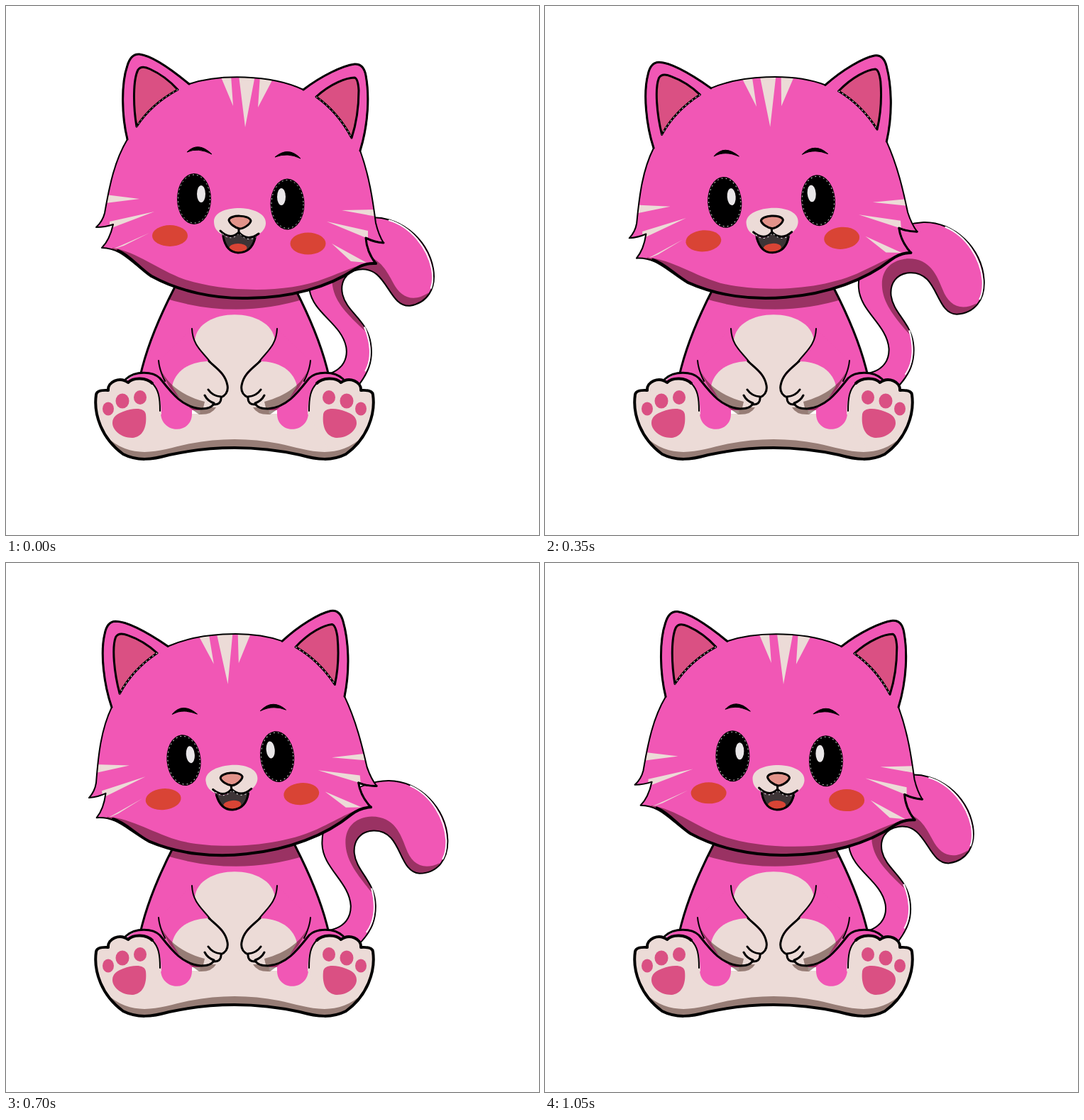
Write an HTML page that moves like this. It is 751x746 px and loops after 1.12 s.

```html
<!DOCTYPE html>
<html lang="en">
<head>
<meta charset="utf-8">
<title>Pink kitten</title>
<style>
  html, body { margin: 0; width: 100%; height: 100%; overflow: hidden; background: #fff; }
  svg { display: block; width: 100vw; height: 100vh; }
  .pink { fill: #f157b5; }
  .cream { fill: #ecdbd7; }
  .rose { fill: #da5083; }
  .blush { fill: #d94435; }
  .shade { fill: #a3928c; mix-blend-mode: multiply; }
  .line { fill: none; stroke: #000; stroke-width: 3; stroke-linecap: round; stroke-linejoin: round; }
  .thin { stroke-width: 2; }
  .bold { stroke-width: 4; }
  .filled { stroke: #000; stroke-width: 3; stroke-linejoin: round; }
  .glint { fill: none; stroke: #fff; stroke-width: 1; stroke-dasharray: 2 4; }
</style>
</head>
<body>
<svg viewBox="0 0 751 746">
  <defs>
    <path id="tailShape" d="M455 540L459 517C478 513 487 500 487 484C486 450 449 430 449 396C449 350 490 309 545 309
      C588 310 626 350 626 395C626 423 610 441 585 441C554 438 563 379 522 379C503 379 493 393 494 410
      C496 436 522 450 522 484C522 508 513 525 490 545Z"/>
    <path id="headShape" d="M171 188C163 155 162 110 171 84Q176 67 188 68C206 70 235 91 258 110
      C300 96 372 96 419 118C445 98 475 84 491 82Q504 81 507 98C512 125 511 165 499 204
      C512 240 517 275 521 306Q525 323 532 334Q518 333 507 327Q508 346 521 363
      Q506 362 492 371C455 396 400 412 340 412C295 413 245 403 205 381C175 362 165 342 135 341
      Q146 330 151 308Q140 312 127 312Q136 304 139 292C146 252 153 218 171 188Z"/>
    <path id="bodyShape" d="M237 396C218 435 200 475 190 518L205 570H439L454 518C444 475 426 435 407 396Z"/>
    <path id="lapShape" d="M127 548Q128 541 144 542C143 530 160 522 172 531C180 523 198 524 206 532
      C217 543 218 556 219 575H425C426 556 427 543 438 532C446 524 464 523 472 531
      C484 522 501 530 500 542Q516 541 517 548C521 576 509 610 479 632C459 642 439 640 414 633
      C354 620 290 620 230 633C205 640 185 642 165 632C135 610 123 576 127 548Z"/>
    <path id="armShape" d="M215 500C218 512 221 524 233 541C246 557 260 567 275 568Q287 570 293 562
      Q304 562 304 552Q313 546 312 533C309 514 292 509 278 491Q262 472 262 455Z"/>
    <clipPath id="tailClip"><use href="#tailShape"/></clipPath>
    <clipPath id="headClip"><use href="#headShape"/></clipPath>
    <clipPath id="bodyClip"><use href="#bodyShape"/></clipPath>
    <clipPath id="lapClip"><use href="#lapShape"/></clipPath>
    <clipPath id="armClip"><use href="#armShape"/></clipPath>

    <path id="thigh" class="pink" d="M168 530Q188 510 214 521L262 560V575C262 604 220 604 218 575L215 560Z"/>
    <path id="foot" class="cream" d="M127 548Q128 541 144 542C143 530 160 522 172 531C180 523 198 524 206 532
      C217 543 218 556 219 575L190 625L140 600Z"/>
    <g id="limbs">
      <path class="shade" d="M258 566H296Q290 577 272 576Z"/>
      <g clip-path="url(#armClip)">
        <use href="#armShape" class="pink"/>
        <path class="cream" d="M234 536C239 513 260 501 288 501L320 540L300 575H258Z"/>
        <path class="shade" d="M213 498C220 528 243 548 280 558L276 575L215 545Z"/>
      </g>
      <path class="line" d="M169 526C182 514 207 515 217 525C232 544 248 566 275 568Q290 568 293 560Q284 557 280 549"/>
      <path class="line" d="M293 562Q304 562 303 551Q291 550 285 541M303 552Q314 547 312 535C309 519 298 512 286 501"/>
      <path class="line thin" d="M262 455C263 480 278 488 290 505M215 500Q216 513 224 529M206 532C215 541 217 552 217 571"/>
    </g>
    <g id="pads" class="rose">
      <ellipse cx="144" cy="568" rx="8" ry="9.5"/>
      <ellipse cx="164" cy="557" rx="9.5" ry="10.5"/>
      <ellipse cx="189" cy="552" rx="9" ry="10"/>
      <path d="M165 572C180 566 196 566 197 576C199 595 192 608 178 609C162 609 150 598 150 588C150 579 157 575 165 572Z"/>
    </g>
    <g id="eye">
      <ellipse rx="24" ry="36"/>
      <ellipse class="glint" rx="22.5" ry="34" opacity=".8"/>
    </g>
  </defs>

  <g id="tail">
    <use href="#tailShape" class="pink"/>
    <path class="shade" clip-path="url(#tailClip)" d="M517 466C497 440 482 420 482 396C482 370 500 359 520 359
      C552 360 560 385 567 405C574 427 590 438 614 427L600 450H560L520 400L500 400Z"/>
    <use href="#tailShape" class="line thin"/>
    <path d="M575 317C605 331 623 365 624 395Q624 412 618 422M517 460C522 480 522 505 508 522"
      fill="none" stroke="#fff" stroke-width="2"/>
  </g>

  <g id="body">
    <use href="#bodyShape" class="pink"/>
    <path class="shade" clip-path="url(#bodyClip)" d="M220 390H424V412Q323 444 220 411Z"/>
    <path class="line" d="M237 398C218 435 200 475 190 518M407 398C426 435 444 475 454 518"/>
    <path class="cream" d="M266 472C270 423 374 423 379 472L370 580H274Z"/>
    <use href="#lapShape" class="cream"/>
    <use href="#thigh"/>
    <use href="#thigh" transform="translate(644 0) scale(-1 1)"/>
    <use href="#foot"/>
    <use href="#foot" transform="translate(644 0) scale(-1 1)"/>
    <path class="shade" clip-path="url(#lapClip)" d="M140 606C180 644 220 625 260 617C300 609 344 609 384 617
      C424 625 464 644 504 606L490 650H150Z"/>
    <path class="line bold" d="M206 532C198 524 180 523 172 531C160 522 143 530 144 542
      Q128 541 127 548C123 576 135 610 165 632C185 642 205 640 230 633C290 620 354 620 414 633
      C439 640 459 642 479 632C509 610 521 576 517 548Q516 541 500 542C501 530 484 522 472 531
      C464 523 446 524 438 532"/>
    <use href="#pads"/>
    <use href="#pads" transform="translate(644 0) scale(-1 1)"/>
    <use href="#limbs"/>
    <use href="#limbs" transform="translate(644 0) scale(-1 1)"/>
  </g>

  <g id="head">
    <g clip-path="url(#headClip)">
      <use href="#headShape" class="pink"/>
      <path class="cream" d="M302 98H317L320 141ZM328 98H351L337 171ZM358 98L376 103L355 143Z
        M140 266L188 272L140 278ZM146 304L209 290L146 314ZM148 344L202 320L166 338Z
        M520 287L473 288L522 297ZM510 317L452 304L510 328ZM486 360L459 335L508 362Z"/>
      <path class="shade" d="M150 341C185 347 215 372 250 385C300 402 390 408 450 384C480 373 500 362 521 362L530 420H130Z"/>
    </g>
    <use href="#headShape" class="line thin"/>
    <path class="line" d="M171 188C163 155 162 110 171 84Q176 67 188 68C206 70 235 91 258 110
      M419 118C445 98 475 84 491 82Q504 81 507 98C512 125 511 165 499 204"/>
    <path class="line bold" d="M521 363Q506 362 492 371C455 396 400 412 340 412C295 413 245 403 205 381C187 369 175 352 158 345"/>
    <path class="line" d="M532 334Q518 333 507 327Q508 346 521 363"/>
    <path class="rose filled" d="M184 170C179 140 179 104 186 90Q191 83 203 89Q225 99 242 118Q205 138 184 170Z
      M437 128C458 109 480 101 491 101Q496 102 497 119Q497 155 487 186Q468 150 437 128Z"/>
    <path class="glint" d="M242 118Q205 138 184 170M437 128Q468 150 487 186"/>

    <path d="M255 206Q271 190 290 209Q271 199 255 206ZM379 213Q398 197 415 215Q397 206 379 213Z"
      stroke="#000" stroke-linejoin="round"/>
    <use href="#eye" transform="translate(265 272)"/>
    <use href="#eye" transform="translate(396.5 279.5)"/>
    <g fill="#e9e6e8">
      <ellipse cx="275" cy="265" rx="6" ry="12"/>
      <ellipse cx="388" cy="269" rx="6" ry="12"/>
    </g>
    <g class="blush">
      <ellipse cx="231" cy="324" rx="25" ry="15"/>
      <ellipse cx="425.5" cy="335" rx="25" ry="15.5"/>
    </g>

    <path class="cream" d="M293 304C293 292 308 285 330 285C353 286 367 295 366 307C365 320 350 327 340 326L328 320L316 325C303 324 293 317 293 304Z"/>
    <path d="M304 321Q317 332 328 320Q340 333 353 324Q349 348 327 348Q308 346 304 321Z" fill="#3d3436"/>
    <ellipse class="blush" cx="327" cy="341" rx="12.5" ry="6"/>
    <path class="line" d="M306 325Q310 347 327 348Q346 348 351 327"/>
    <path class="line" d="M302 317Q316 331 328 319Q340 333 356 321M328 314V319"/>
    <path class="glint" d="M305 321Q316 332 327 322M330 322Q340 333 352 326"/>
    <path class="filled" fill="#e2938a" d="M314 302C315 294 343 294 345 303C344 308 335 314 329 314C323 313 315 307 314 302Z"/>
  </g>
</svg>
<script>
  const LOOP = 1120, STEP = 70;
  const head = document.getElementById('head');
  const tail = document.getElementById('tail');

  // Even swing from 0 to 1 and back, with a short rest at each end.
  function swing(t) {
    const u = (Math.min(t, LOOP - t) - 55) / 465;
    return Math.min(1, Math.max(0, u));
  }

  const start = performance.now();
  function draw(now) {
    const t = Math.floor(Math.max(0, now - start) % LOOP / STEP) * STEP;
    const s = swing(t);
    head.setAttribute('transform', `rotate(${-6.95 * s} 322 427)`);
    tail.setAttribute('transform', `rotate(${9.9 * (s - 0.94)} 465 530)`);
    requestAnimationFrame(draw);
  }
  draw(start);
</script>
</body>
</html>
```
